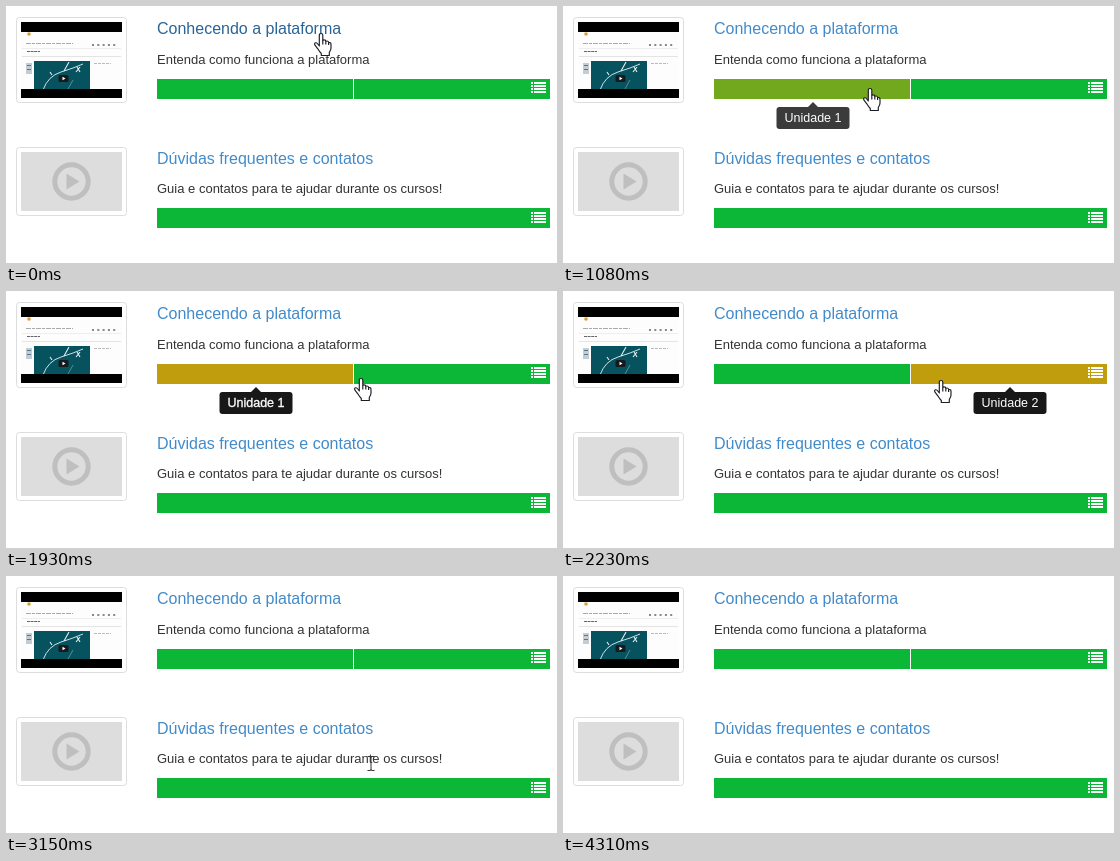
An HTML page for the animation above (4.38 s loop, 551x257 px).

```html
<!DOCTYPE html>
<html lang="pt">
<head>
<meta charset="utf-8">
<style>
  html, body { margin: 0; width: 100%; height: 100%; overflow: hidden; background: #fff; }
  svg { display: block; width: 551px; height: 257px; font-family: "Liberation Sans", Arial, sans-serif; }
  .title { font-size: 16px; }
  .body { font-size: 13px; fill: #333; }
  .tip text { font-size: 12.5px; fill: #fff; stroke: #fff; text-anchor: middle; }
</style>
</head>
<body>
<svg viewBox="0 0 551 257">
  <defs>
    <g id="list" fill="#fff">
      <path d="M525 76h2v2h-2zm0 3h2v2h-2zm0 3h2v2h-2zm0 3h2v2h-2z"/>
      <path d="M528 76h12v2h-12zm0 3h12v2h-12zm0 3h12v2h-12zm0 3h12v2h-12z"/>
    </g>
    <clipPath id="board"><path d="M28 55h56v28h-56z"/></clipPath>
  </defs>

  <g fill="#fff" stroke="#ddd">
    <rect x="10.5" y="11.5" width="110" height="85" rx="3"/>
    <rect x="10.5" y="141.5" width="110" height="68" rx="3"/>
  </g>

  <!-- video still -->
  <path d="M15 16h101v10h-101zM15 83h101v9h-101z"/>
  <path d="M15 26h101v57h-101z" fill="#fdfdfd"/>
  <circle cx="23" cy="28" r="1.8" fill="#e0a030"/>
  <path d="M20 37.5h47" stroke="#aaa" stroke-dasharray="5 1 3 1"/>
  <path d="M86 39h24" stroke="#888" stroke-width="2" stroke-dasharray="2 3.3"/>
  <path d="M16 42.5h99" stroke="#eee"/>
  <path d="M21 45.5h13" stroke="#666" stroke-dasharray="3 .6"/>
  <path d="M16 50.5h99" stroke="#e4e4e4"/>
  <path d="M88 57.5h17" stroke="#bbb" stroke-dasharray="3 1"/>
  <path d="M20 57h6v11h-6z" fill="#c3ccd2"/>
  <path d="M21 59.5h4M21 63.5h4" stroke="#55788c"/>
  <path d="M28 55h56v28h-56z" fill="#07525f"/>
  <g clip-path="url(#board)" fill="none" stroke="#e4f0f2">
    <path d="M37 84Q42 70 55 66T77 58" stroke-width=".9"/>
    <path d="M63 56l-5 9M71 61l3 5M70 66l4-5M44 66l2 3" stroke-width="1.1"/>
    <path d="M62 83l5-9" stroke="#78a5ad" stroke-width=".7"/>
  </g>
  <rect x="52.500" y="69" width="10" height="7" rx="1.500" fill="#161a1c"/>
  <path d="M56.500 70.800v3.400l3-1.700z" fill="#fff"/>

  <!-- empty video -->
  <path d="M15 146h101v59h-101z" fill="#ddd"/>
  <circle cx="65.500" cy="175.500" r="16.700" fill="none" stroke="#bfbfbf" stroke-width="5"/>
  <path d="M60.500 167.500v16l13-8z" fill="#bfbfbf"/>

  <text class="title" id="title1" x="151" y="28">Conhecendo a plataforma</text>
  <text class="body" x="151" y="58">Entenda como funciona a plataforma</text>
  <text class="title" id="title2" x="151" y="158">Dúvidas frequentes e contatos</text>
  <text class="body" x="151" y="187">Guia e contatos para te ajudar durante os cursos!</text>

  <g id="units"></g>
  <use href="#list"/>
  <use href="#list" y="130"/>
  <g id="tips"></g>

  <g id="cursor" stroke-linejoin="round">
    <g id="hand" fill="#fff" stroke="#1c1c24" stroke-width="1.150">
      <path d="M-1.700 13V2.300Q-1.700 .5 0 .5Q1.800 .5 1.800 2.300V7.500Q2.200 6.800 3.300 6.900Q4.800 7 4.800 8.500Q5.300 7.900 6.200 8Q7.600 8.200 7.600 9.600Q10 9 10 11.500V15Q10 17 8.300 19.300V22.500H.3V20.500Q-1.300 19-3.200 15.800L-6 12.200Q-7 10.300-5.500 9.800Q-4.200 9.400-3.200 11Z"/>
      <path d="M1.800 7.500V11.500M4.800 8.500V11.500M7.600 9.600V12" fill="none"/>
    </g>
    <path id="beam" fill="none" stroke="#333" d="M-3.500-6.500H-1Q0-6.500 0-5.500Q0-6.500 1-6.500H3.500M0-6V7M-3.500 7.500H-1Q0 7.500 0 6.500Q0 7.500 1 7.500H3.500"/>
    <path id="arrow" fill="#fff" stroke="#1c1c24" d="M.5 .5V16.500L4 13.200L6.400 18.500L8.800 17.400L6.500 12.300H11.500Z"/>
  </g>
</svg>
<script>
const LOOP = 4380, FPS = 13;
const GREEN = [12, 182, 54], GOLD = [192, 157, 12];
const LINK = '#428bca', LINK_HOVER = '#2a6496';

const units = [
  { x: 151, w: 196, y: 73, center: 250, label: 'Unidade 1', enter: 13, leave: 26, settle: 20 },
  { x: 348, w: 196, y: 73, center: 447, label: 'Unidade 2', enter: 26, leave: 36, settle: 33 },
  { x: 151, w: 393, y: 202, center: 348.5, label: 'Unidade 1', enter: 45, leave: 99, settle: 51 }
];

const $ = id => document.getElementById(id);
const clamp = v => Math.max(0, Math.min(1, v));
const mix = (a, b, u) => a + (b - a) * u;
const smooth = u => u * u * (3 - 2 * u);
const easeOut = u => 1 - (1 - u) ** 2;

const moves = [
  { from: 6, to: 13, end: [307, 82], ease: smooth },
  { from: 22, to: 29, end: [378, 89], ease: easeOut },
  { from: 34, to: 41, end: [365, 187], ease: smooth },
  { from: 41, to: 47, end: [355, 211], ease: smooth }
];

function add(parent, name, attrs) {
  const el = document.createElementNS('http://www.w3.org/2000/svg', name);
  for (const key in attrs) el.setAttribute(key, attrs[key]);
  return parent.appendChild(el);
}

for (const u of units) {
  u.bar = add($('units'), 'rect', { x: u.x, y: u.y, width: u.w, height: 20 });
  u.tip = add($('tips'), 'g', { class: 'tip', transform: `translate(${u.center} ${u.y + 23})` });
  add(u.tip, 'path', { d: 'M-5 5L0 0L5 5Z' });
  add(u.tip, 'rect', { x: -36.5, y: 5, width: 73, height: 22, rx: 3 });
  u.text = add(u.tip, 'text', { x: 0, y: 20 });
  u.text.textContent = u.label;
}

function pointerAt(n) {
  let pos = [314.5, 27];
  for (const m of moves) {
    const u = m.ease(clamp((n - m.from) / (m.to - m.from)));
    pos = pos.map((v, i) => mix(v, m.end[i], u));
  }
  return pos;
}

function render(t) {
  const n = Math.floor(t * FPS / 1000 + 0.12);
  const gone = n >= 56;
  const [x, y] = pointerAt(n);
  const within = (a, b) => y >= a && y < b;

  const onTitle1 = !gone && y < 34;
  const onTitle2 = !gone && within(141, 164) && x < 372;
  const onBar = within(73, 93) || within(202, 222);
  const onBody = within(44, 63) || within(176, 195);
  const kind = onTitle1 || onTitle2 || onBar ? 'hand' : onBody ? 'beam' : 'arrow';

  $('title1').setAttribute('fill', onTitle1 ? LINK_HOVER : LINK);
  $('title2').setAttribute('fill', onTitle2 ? LINK_HOVER : LINK);

  for (const u of units) {
    const fade = start => clamp((n - start + 0.7) / 3);
    const rise = n >= u.enter ? fade(u.enter) : 0;
    const fall = n >= u.leave ? fade(u.leave) : 0;
    const level = gone ? 0 : rise * (1 - fall);
    const rgb = GREEN.map((c, i) => Math.round(mix(c, GOLD[i], level)));
    u.bar.setAttribute('fill', `rgb(${rgb})`);
    u.tip.setAttribute('opacity', 0.9 * clamp(fall ? 1 - 1.5 * fall : 1.5 * level));
    u.text.setAttribute('stroke-width', n >= u.settle ? 0.35 : 0);
  }

  $('cursor').setAttribute('transform', `translate(${Math.round(x)} ${Math.round(y)})`);
  $('cursor').setAttribute('display', gone ? 'none' : 'inline');
  for (const id of ['hand', 'beam', 'arrow']) {
    $(id).setAttribute('display', id === kind ? 'inline' : 'none');
  }
}

const start = performance.now();
function frame() {
  render((performance.now() - start) % LOOP);
  requestAnimationFrame(frame);
}
frame();
</script>
</body>
</html>
```
